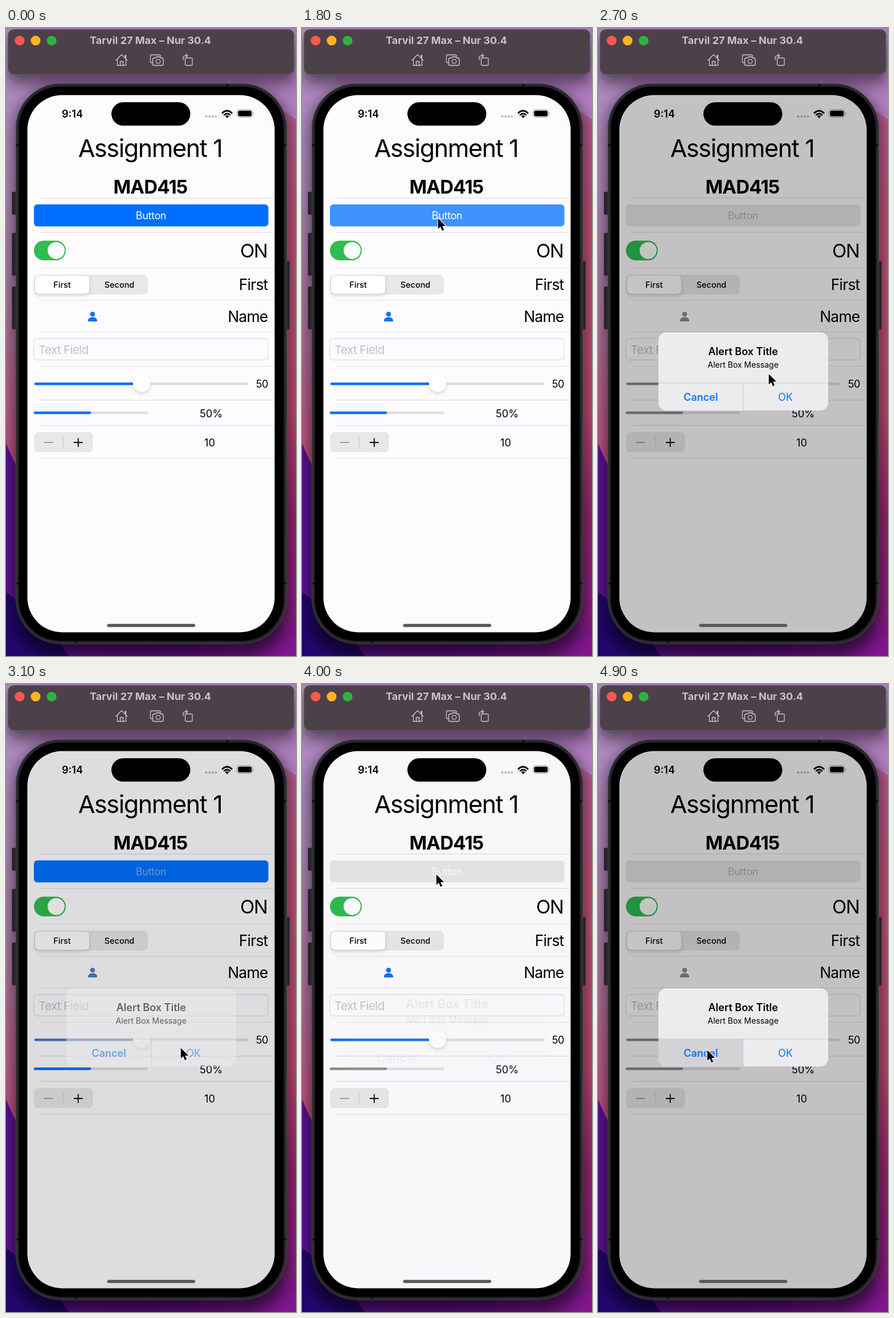
An HTML page that plays this animation: 509 px wide and 1100 px high, repeating every 5000 ms.

```html
<!DOCTYPE html>
<html lang="en">
<head>
<meta charset="utf-8">
<title>Form with alert</title>
<style>
html, body { margin: 0; height: 100%; overflow: hidden; background: #222; }
svg { display: block; width: 100vw; height: 100vh; font-family: Inter, "Noto Sans", sans-serif; }
.mid { text-anchor: middle; }
.end { text-anchor: end; letter-spacing: -.03em; }
.num { font-size: 18.2px; }
.line { fill: none; stroke: #d0c8ce; stroke-width: 1.3; stroke-linejoin: round; stroke-linecap: round; }
</style>
</head>
<body>
<svg viewBox="0 0 509 1100" preserveAspectRatio="none">
  <defs>
    <linearGradient id="left" x2="0" y2="1">
      <stop stop-color="#b08ac0"/><stop offset=".2" stop-color="#ae88be"/>
      <stop offset=".45" stop-color="#a873a0"/><stop offset=".68" stop-color="#bd527c"/>
    </linearGradient>
    <linearGradient id="right" x2="0" y2="1">
      <stop stop-color="#b06ab0"/><stop offset=".12" stop-color="#b55a92"/>
      <stop offset=".3" stop-color="#bd5077"/><stop offset=".6" stop-color="#b94a70"/>
      <stop offset=".78" stop-color="#92256c"/><stop offset="1" stop-color="#83198c"/>
    </linearGradient>
    <linearGradient id="purple" x2="1">
      <stop stop-color="#5b1190"/><stop offset=".5" stop-color="#5d0f83"/><stop offset="1" stop-color="#82188c"/>
    </linearGradient>
    <filter id="blur" x="-20%" y="-40%" width="140%" height="180%"><feGaussianBlur stdDeviation="13"/></filter>
    <filter id="soft" x="-40%" y="-40%" width="180%" height="200%">
      <feDropShadow dx="0" dy="3" stdDeviation="3" flood-opacity=".16"/>
    </filter>
    <clipPath id="glass"><rect x="37.500" y="117.500" width="434" height="941" rx="61"/></clipPath>
    <clipPath id="card"><rect x="106" y="533" width="298" height="137" rx="14"/></clipPath>
  </defs>

  <!-- desktop -->
  <rect width="509" height="1100" fill="url(#left)"/>
  <path d="M300 0H509V1100H300z" fill="url(#right)"/>
  <path d="M60 0H509V160L420 100H60z" fill="#b07cbe"/>
  <path d="M0 727Q50 850 170 960L509 1050V1100H0z" fill="url(#purple)"/>
  <path d="M0 988Q60 1030 110 1100H0z" fill="#22066a"/>
  <rect x="14" y="106" width="482" height="994" rx="76" opacity=".55" filter="url(#blur)"/>
  <rect x="4" y="16" width="501" height="82" rx="10" opacity=".5" filter="url(#blur)"/>

  <!-- window bar -->
  <rect x="3.5" y="2.5" width="502" height="79" rx="10" fill="#4c4149" stroke="#685d66"/>
  <circle cx="24" cy="22" r="8.6" fill="#ff5850"/>
  <circle cx="52" cy="22" r="8.6" fill="#fdb225"/>
  <circle cx="80" cy="22" r="8.6" fill="#2bb441"/>
  <text class="mid" x="253.5" y="28" font-size="18" font-weight="700" fill="#cbc2c9">Tarvil 27 Max – Nur 30.4</text>
  <g class="line">
    <path d="M193 56.500L203 46.500l10 10M195.500 55v10.500h15V55M200.500 65v-6.500h5V65M209 52v-4.500h1.500V53"/>
    <path d="M257 61h-1.500q-2 0-2-2V49q0-2 2-2H269q2 0 2 2v1M259.500 52.500h3l1.500-2h6l1.500 2h2.500q2 0 2 2v9q0 2-2 2h-14.500q-2 0-2-2v-9q0-2 2-2z"/>
    <circle cx="267" cy="58.500" r="3.700"/>
    <path d="M316 52.500h9.500q1.500 0 1.500 1.500v10q0 1.500-1.500 1.500H316q-1.500 0-1.500-1.500V54q0-1.500 1.500-1.500zM311 56v-3.500q0-4 4-4h3.500M316 45.500l3 3-3 3"/>
  </g>

  <!-- handset -->
  <g fill="#242326" stroke="#47464a">
    <rect x="10.500" y="287" width="9" height="40" rx="2"/>
    <rect x="10.500" y="359" width="9" height="75" rx="2"/>
    <rect x="10.500" y="453" width="9" height="75" rx="2"/>
    <rect x="490" y="408" width="8" height="120" rx="2"/>
    <rect x="17.500" y="97.500" width="475" height="981" rx="78"/>
  </g>
  <rect x="19.500" y="99.500" width="471" height="977" rx="76" fill="none" stroke="#333235"/>
  <rect x="22.500" y="102.500" width="465" height="971" rx="73"/>
  <path d="M18 205h5M487 205h5M18 973h5M487 973h5M388 98v5M122 1073v5" stroke="#111" stroke-width="4"/>

  <g clip-path="url(#glass)">
    <rect x="37" y="117" width="435" height="942" fill="#fdfbfe"/>
    <text class="mid" x="116.500" y="157" font-size="18" font-weight="600">9:14</text>
    <path d="M351.500 155h.01M357.300 155h.01M362.800 155h.01M368.300 155h.01" stroke="#b8b6ba" stroke-width="4" stroke-linecap="round"/>
    <g fill="none" stroke="#000" stroke-width="2.800">
      <path d="M379 149.500q9-9 18 0M382.300 152.700q5.700-5.500 11.400 0"/>
    </g>
    <path d="M384.700 154.500q3.300-2.800 6.600 0l-3.300 3.500z"/>
    <rect x="405.500" y="143" width="27.500" height="13.500" rx="4.300" fill="none" stroke="#99979b"/>
    <rect x="407.300" y="144.800" width="23.900" height="9.900" rx="2.800"/>
    <path d="M434.300 147.500q1.800 2.200 0 4.500z" fill="#99979b"/>

    <text class="mid" x="253" y="226" font-size="43" letter-spacing="-.032em">Assignment 1</text>
    <text class="mid" x="253.500" y="290" font-size="33" font-weight="700" letter-spacing="-.025em">MAD415</text>
    <path id="rules" stroke="#dfdde0" stroke-width="1.200"/>

    <rect id="button" x="49" y="309" width="411.500" height="38.500" rx="6"/>
    <text id="label" class="mid" x="254.500" y="335" font-size="18" letter-spacing="-.02em">Button</text>

    <rect x="49" y="372.500" width="56" height="34.500" rx="17.250" fill="#2fbc50"/>
    <circle cx="88" cy="389.800" r="14.900" fill="#fff"/>
    <text class="end" x="459" y="402" font-size="33">ON</text>

    <rect x="49" y="432" width="200" height="35" rx="8" fill="#e9e7ea"/>
    <rect x="51" y="434" width="95" height="31.500" rx="7" fill="#fff" filter="url(#soft)"/>
    <g class="mid" font-size="14.500" font-weight="500">
      <text x="98.500" y="455">First</text><text x="199" y="455">Second</text>
    </g>
    <text class="end" x="459.500" y="459" font-size="26.500">First</text>

    <path id="person" d="M152 497a4.300 4.300 0 0 1 0 8.600a4.300 4.300 0 0 1 0-8.600zM144 512.500c0-8 16-8 16 0q0 1.500-1.500 1.500h-13q-1.500 0-1.500-1.500z"/>
    <text class="end" x="459.500" y="515" font-size="26.500">Name</text>

    <rect x="49" y="544" width="411" height="37.500" rx="6" fill="none" stroke="#e2e0e3" stroke-width="1.300"/>
    <text x="57" y="571" font-size="20.700" letter-spacing="-.035em" fill="#c3c1c4">Text Field</text>

    <g fill="none" stroke-width="4.600" stroke-linecap="round">
      <path d="M52 623.300H423M51 674H247" stroke="#dfdde0"/>
      <path id="slider" d="M52 623.300H238"/>
      <path id="progress" d="M51 674H147"/>
    </g>
    <circle cx="238" cy="622" r="15.300" fill="#fff" filter="url(#soft)"/>
    <text class="end num" x="460" y="629.500">50</text>
    <text class="mid num" x="360" y="681.500">50%</text>

    <rect x="49" y="708" width="103.500" height="35" rx="8" fill="#e9e7ea"/>
    <path d="M100.500 716v20" stroke="#cfcdd0"/>
    <path d="M67 726h15" stroke="#868488" stroke-width="1.600"/>
    <path d="M119 726h15.500M126.700 718.300v15.500" stroke="#000" stroke-width="1.800"/>
    <text class="mid num" x="357.500" y="732.500">10</text>

    <rect id="dim" x="37" y="117" width="435" height="942"/>
    <rect x="177.500" y="1043.800" width="154.500" height="5.400" rx="2.700" fill="#59575b"/>
  </g>
  <rect x="185" y="130" width="138.500" height="41" rx="20.500"/>

  <g id="alert">
    <g clip-path="url(#card)">
      <path d="M106 533h298v137H106z" fill="#ececee"/>
      <path id="pressed" d="M0 622h149v48H0z" fill="#d3d2d5"/>
      <path d="M106 621.700h298M254.800 622v48" stroke="#cbc9cd"/>
    </g>
    <g class="mid" font-size="18">
      <text x="254.700" y="573" font-weight="600">Alert Box Title</text>
      <text x="254.700" y="595" font-size="14">Alert Box Message</text>
      <g fill="#0a78f5">
        <text x="180.500" y="653" font-weight="600">Cancel</text><text x="329" y="653">OK</text>
      </g>
    </g>
  </g>

  <path id="cursor" d="M.8 1.500v18.500l4.200-4 3 7 3.200-1.400-2.900-6.700h5.900z" stroke="#fff" stroke-width="2" paint-order="stroke"/>
</svg>
<script>
const LOOP = 5000, STEP = 100;
const BLUE = '#006fff', GREY = '#8c8a8d';
const el = Object.fromEntries([...document.querySelectorAll('svg > [id], svg g [id]')].map(e => [e.id, e]));

el.rules.setAttribute('d', [297.6, 358.2, 420.5, 477, 532.5, 592.5, 651.8, 696.2, 753.8]
  .map(y => `M60 ${y}H472`).join(''));

// time, x, y of the pointer tip
const path = [
  [600, 205, 440], [1100, 231, 343], [1400, 238, 332], [2300, 238, 332],
  [2800, 306, 636], [3100, 306, 636], [3500, 241, 293], [3750, 235, 332],
  [4300, 235, 332], [4750, 191, 640], [LOOP, 191, 640]
];

const during = (t, a, b) => t >= a && t < b;
const mix = (a, b, p) => `color-mix(in srgb, ${a}, ${b} ${p * 100}%)`;

// critically damped spring from 0 to 1
function spring(ms) {
  const x = Math.max(0, ms) * .0122;
  return 1 - (1 + x) * Math.exp(-x);
}

function pointer(t) {
  const i = Math.max(1, path.findIndex(k => k[0] > t));
  const [t0, x0, y0] = path[i - 1], [t1, x1, y1] = path[i];
  const u = Math.min(1, Math.max(0, (t - t0) / (t1 - t0))), e = u * u * (3 - 2 * u);
  return [x0 + (x1 - x0) * e, y0 + (y1 - y0) * e];
}

function draw(t) {
  const open = during(t, 1900, 2973) || t >= 3967;
  const closing = during(t, 2973, 3500);
  const p = open ? spring(t - (t < 3000 ? 1900 : 3967)) : closing ? 1 - spring(t - 2973) : 0;

  el.dim.style.opacity = .23 * p;
  el.alert.style.opacity = p;
  const scale = open ? 1.2 - .2 * p : 1;
  el.alert.setAttribute('transform', `translate(255 601.5) scale(${scale}) translate(-255 -601.5)`);

  el.button.style.fill = open ? '#e7e5e8' : BLUE;
  el.button.style.opacity = during(t, 1700, 1900) || during(t, 3800, 3967) ? .75 : 1;
  el.label.style.fill = mix('#fff', 'rgb(60 60 67 / .3)', p);
  el.person.style.fill = el.slider.style.stroke = mix(BLUE, GREY, p);
  el.progress.style.stroke = open ? GREY : BLUE;

  const ok = during(t, 2800, 2973);
  el.pressed.style.opacity = ok || t >= 4800 ? 1 : 0;
  el.pressed.setAttribute('transform', `translate(${ok ? 255 : 106})`);

  el.cursor.style.opacity = t >= 600 ? 1 : 0;
  el.cursor.setAttribute('transform', `translate(${pointer(t)})`);
}

const start = performance.now();
function tick() {
  draw(Math.floor((performance.now() - start) % LOOP / STEP) * STEP);
  requestAnimationFrame(tick);
}
tick();
</script>
</body>
</html>
```
